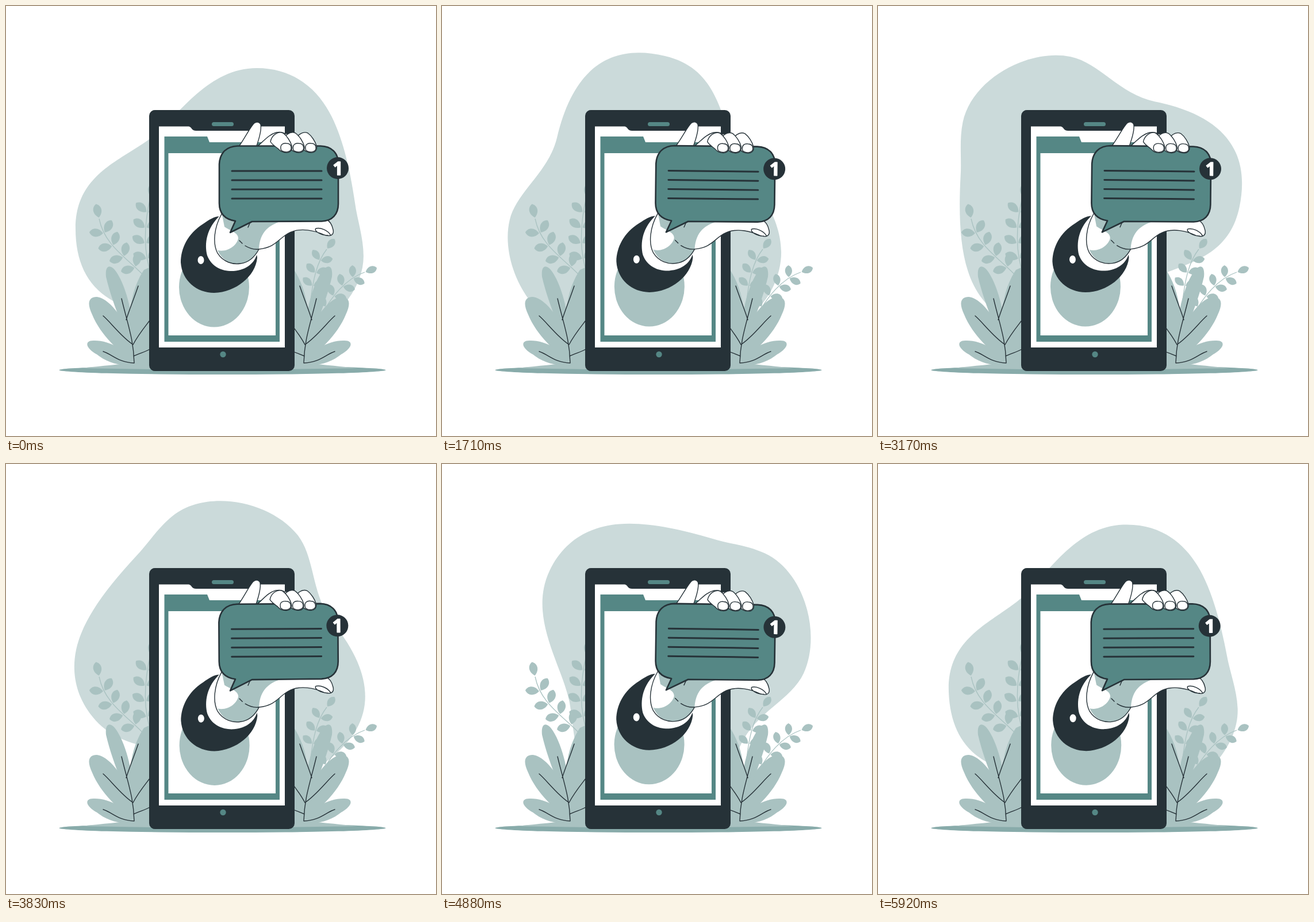
Animation of 748x748 px, one loop 5.96 s. Source, as an HTML page:

```html
<!DOCTYPE html>
<html lang="en">
<head>
<meta charset="utf-8">
<title>New message</title>
<style>
  html, body { margin: 0; width: 100%; height: 100%; overflow: hidden; background: #fff; }
  svg { display: block; width: 100%; height: 100%; }
  .dark { fill: #263238; }
  .teal { fill: #558785; }
  .soft { fill: #a9c2c1; }
  .white { fill: #fff; }
  .line { stroke: #263238; stroke-width: 1.4; stroke-linecap: round; stroke-linejoin: round; }
  .open { fill: none; }
  .stem { fill: none; stroke: #a9c2c1; stroke-width: 1.3; }
</style>
</head>
<body>
<svg viewBox="0 0 748 748">
  <defs>
    <g id="bush">
      <path class="soft" d="M130 630C170 626 200 623 223 620L260 614V632Z"/>
      <path class="soft" d="M223 622C203 629 175 620 158 606C138 595 136 582 152 582C180 581 212 600 223 622"/>
      <path class="soft" d="M223 620C200 605 164 572 150 537C140 516 144 506 158 506C180 508 210 548 224 592Z"/>
      <path class="soft" d="M222 604C205 562 185 518 174 471C172 451 181 449 190 460C209 485 222 540 224 592Z"/>
      <path class="soft" d="M222 610C208 570 212 500 240 459L260 450V620L223 622Z"/>
      <path class="line open" d="M223 621C222 580 212 555 201 509M209 546C214 530 224 505 230 487M221 589C200 575 182 550 169 539M221 589C230 572 240 560 250 547M223 621C195 620 185 606 169 601M222 609C232 604 242 602 250 597"/>
    </g>
    <g id="finger" class="white line">
      <path d="M-27-10C-25-21-14-29-5-25C2-20 8-10 10-3C12 4 8 9 1 9C-8 9-11 5-14 2C-19-2-24-5-27-10Z"/>
      <path d="M-9 2C-10-5-5-8 1-7C7-7 10-3 9 3C7 8 0 9-5 7C-8 6-9 4-9 2Z"/>
    </g>
  </defs>

  <path id="blob" fill="#cbdada" d="M436 108C500 108 540 144 562 184C585 225 598 282 607 342C611 372 622 402 622 435C622 512 535 584 461 584C410 584 365 537 302 537C175 537 121 482 121 387C121 298 190 273 245 235C298 196 348 108 436 108Z"/>
  <ellipse cx="376.500" cy="633.300" rx="284" ry="7.800" fill="#88abaa"/>
  <g id="sprigs" class="soft"></g>
  <use href="#bush"/>
  <use href="#bush" transform="translate(741) scale(-1 1)"/>

  <rect class="dark" x="249" y="181" width="253" height="454" rx="10"/>
  <path class="white" d="M266 209.500H318C324 211 322 217 331 217H423C432 217 430 211 436 209.500H485V594H266Z"/>
  <rect class="teal" x="358" y="202" width="38" height="7" rx="3.500"/>
  <circle class="teal" cx="377.500" cy="606" r="5.200"/>
  <path class="teal" fill-rule="evenodd" d="M275.500 227H350L354 237H476V584H275.500ZM282.500 256H469V573H282.500Z"/>

  <g id="hand">
    <ellipse class="soft" cx="362" cy="489" rx="61" ry="69.500"/>
    <path class="dark" d="M371 366C362 366 353 372 343 379C316 396 304 422 304 446C306 478 332 499 362 499C400 498 434 470 437 438C437 433 435 430 433 429L400 420L365 410Z"/>
    <path class="white" d="M374 363C348 386 345 414 350 434C358 455 378 462 396 461C420 459 433 446 437 430L440 421L420 400L385 362Z"/>
    <path class="white" d="M375 362C362 385 359 413 368 430C378 446 395 450 408 448C424 446 433 436 440 423C468 420 472 407 490 396C512 383 540 392 553 398C565 402 571 398 569 389C567 380 562 373 556 371L470 340H390Z"/>
    <path class="soft" d="M376 364L398 368L480 374C458 381 442 392 440 422C433 437 424 446 408 448C390 450 376 442 368 425C386 429 402 416 404 404C404 394 390 391 380 384Z"/>
    <path class="line open" d="M375 362C362 385 359 413 368 430C378 446 395 450 408 448C424 446 433 436 440 423M416 417C424 422 432 424 440 423C468 420 472 407 490 396C512 383 540 392 553 398C565 402 571 398 569 389C567 380 562 373 556 371M406 408L411 413M424 378L421 385M565 399C560 390 547 385 539 387C535 391 547 399 560 399"/>
    <path class="white line" d="M404 246C414 232 422 216 429 207C433 201 440 200 443 206C445 215 441 229 435 246Z"/>
    <path class="white" d="M437 246C448 236 456 224 470 220L510 226L520 246Z"/>
    <path class="line open" d="M437 244C448 236 456 224 470 220C476 219 482 219 486 223"/>
    <path class="teal line" style="stroke-width:2.600" d="M403 243.500H547C566 244 578 255 578 274V344C578 363 567 374 549 374.500L428 375L390 394L399 374C380 371 371 360 371 343V275C372 255 384 244 403 243.500Z"/>
    <path class="line open" style="stroke-width:3" d="M393 287H549M393 303H549M393 319H549M393 335H549"/>
    <use href="#finger" x="530" y="246"/>
    <use href="#finger" x="508.500" y="246"/>
    <use href="#finger" x="487" y="246"/>
    <ellipse class="white" cx="339" cy="442" rx="5.500" ry="7"/>
    <circle class="dark" cx="577" cy="282" r="19"/>
    <text class="white" x="577.500" y="293.500" text-anchor="middle" font-family="'Open Sans', sans-serif" font-size="32" font-weight="700" stroke="#fff" stroke-width="1.500" stroke-linejoin="round">1</text>
  </g>
</svg>
<script>
const LOOP = 5960;
const blob = document.getElementById('blob');
const hand = document.getElementById('hand');
const sprigs = document.getElementById('sprigs');

function addPath(attrs) {
  const path = document.createElementNS('http://www.w3.org/2000/svg', 'path');
  for (const k in attrs) path.setAttribute(k, attrs[k]);
  return sprigs.appendChild(path);
}

// A stem with one leaf at its tip and leaf pairs at even steps below it.
function addSprig(d, scale) {
  const stem = addPath({ d, class: 'stem' });
  const step = 27 * scale, length = stem.getTotalLength();
  const leaf = (p, angle) => addPath({
    d: 'M2 0C9-9 21-10 26 0C21 10 9 9 2 0Z',
    transform: `translate(${p.x} ${p.y}) rotate(${angle}) scale(${scale})`
  });
  for (let at = length; at > step; at -= step) {
    const p = stem.getPointAtLength(at), q = stem.getPointAtLength(at - 2);
    const angle = Math.atan2(p.y - q.y, p.x - q.x) * 180 / Math.PI;
    if (at === length) leaf(p, angle);
    else [-58, 58].forEach(turn => leaf(p, angle + turn));
  }
}
addSprig('M248 478C215 440 172 420 162 370', 1);
addSprig('M254 470C238 430 240 380 251 333', 1);
addSprig('M530 512C534 478 540 446 558 423', 0.86);
addSprig('M545 545C565 505 592 474 624 463', 0.86);

function draw() {
  const t = performance.now() % LOOP / LOOP;
  blob.setAttribute('transform', `rotate(${t * 360} 373 342.5)`);
  hand.setAttribute('transform', `rotate(${0.8 * Math.sin(t * 8 * Math.PI)} 449 385)`);
  requestAnimationFrame(draw);
}
draw();
</script>
</body>
</html>
```
